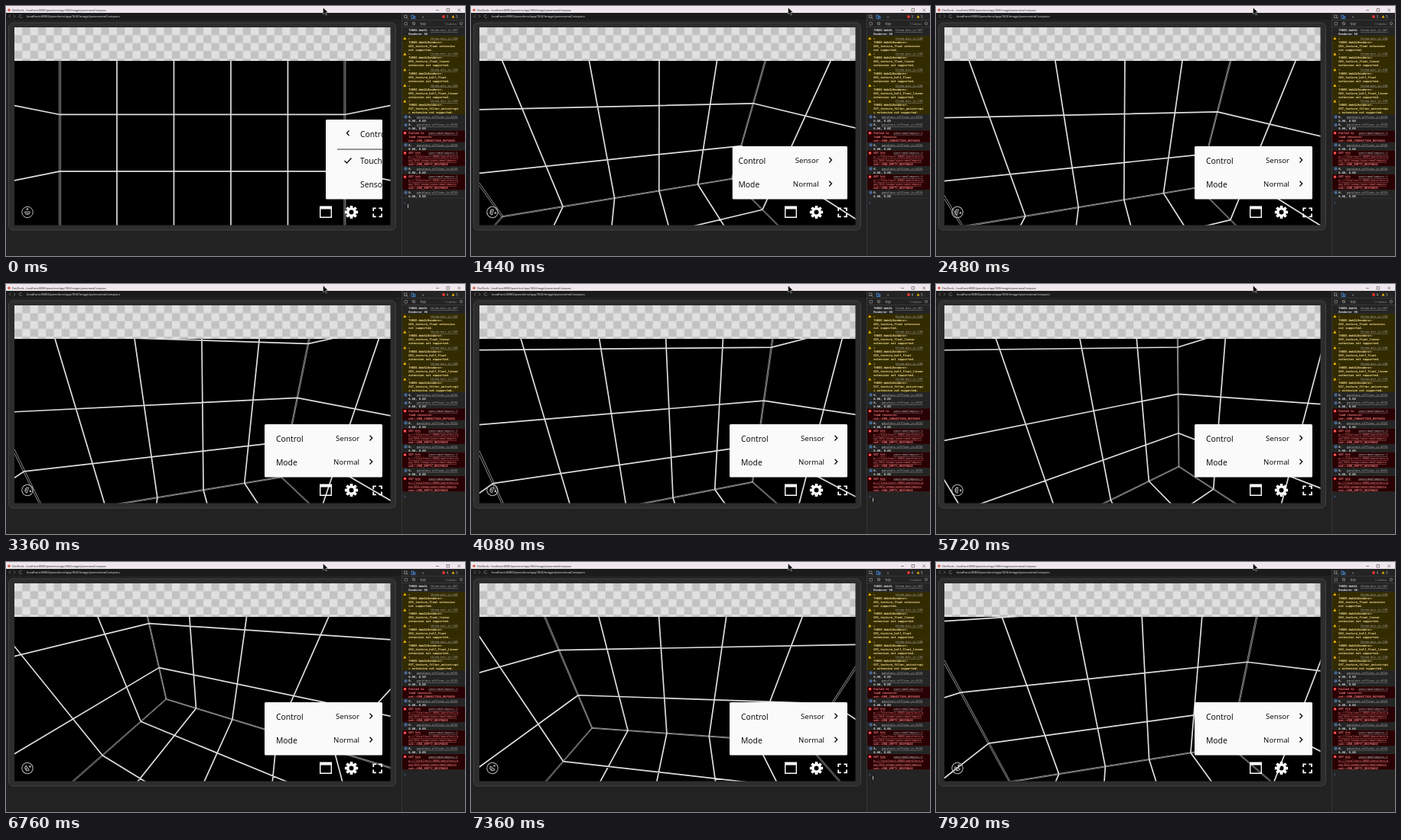
Animation, 600 px wide and 328 px high, one loop 8 s. Source, as an HTML page:

```html
<!DOCTYPE html>
<html lang="en">
<head>
<meta charset="utf-8">
<title>Panorama compass</title>
<style>
  html, body { margin: 0; width: 100%; height: 100%; overflow: hidden; background: #222; }
  svg { display: block; width: 600px; height: 328px; }
  .ui { font-family: "Open Sans", "Noto Sans", sans-serif; font-size: 4.6px; }
  .log { font-family: "DejaVu Sans Mono", monospace; font-size: 3.72px; font-weight: bold; }
  .menu { font-family: "Noto Sans", sans-serif; font-size: 10.3px; fill: #111; }
  .value { font-size: 9.6px; text-anchor: end; }
  .line { fill: none; stroke: #111; stroke-width: 1.4; }
  .link { text-anchor: end; text-decoration: underline; fill: #aaa; font-weight: normal; }
</style>
</head>
<body>
<svg viewBox="0 0 600 328" xmlns="http://www.w3.org/2000/svg">
  <defs>
    <pattern id="checker" x="11" y="28" width="20.6" height="20.6" patternUnits="userSpaceOnUse">
      <rect width="20.6" height="20.6" fill="#c2c2c2"/>
      <path d="M0 0h10.3v20.6h10.3v-10.3h-20.6z" fill="#e0e0e0"/>
    </pattern>
    <clipPath id="view"><rect x="11" y="72" width="491.5" height="215.5"/></clipPath>
    <clipPath id="panelClip"><rect id="clipBox" rx="1.5"/></clipPath>
  </defs>

  <!-- window chrome -->
  <rect width="600" height="328" fill="#222"/>
  <rect width="600" height="9" fill="#efe7ed"/>
  <circle cx="4" cy="5.2" r="1.8" fill="#d8604a"/>
  <text class="ui" x="8" y="6.700" fill="#222" style="font-size:3.7px">DevTools - localhost:8080/panolens/app/360/image/panoramaCompass</text>
  <path d="M562 5.500h4M576 3.500h3.600v3.600H576zM590.500 3.500l3.600 3.600m0-3.600l-3.600 3.600" fill="none" stroke="#444" stroke-width=".6"/>
  <rect y="9" width="517" height="9" fill="#1b1b1b"/>
  <path d="M6 11.500l-2 2 2 2M10 11.500l2 2-2 2M20.500 12.100a2 2 0 1 0 .5 2" fill="none" stroke="#888" stroke-width=".7"/>
  <text class="ui" x="27" y="14.800" fill="#eee" style="font-size:4.3px">localhost:8080/panolens/app/360/image/panoramaCompass</text>
  <rect x="3.500" y="22" width="506" height="272" rx="6" fill="#2d2d2d" stroke="#484848" stroke-width=".8"/>
  <rect x="11" y="28" width="491.500" height="44" fill="url(#checker)"/>

  <!-- panorama -->
  <g clip-path="url(#view)">
    <rect x="11" y="72" width="492" height="216"/>
    <path id="edges" fill="none" stroke="#a0a0a0" stroke-width=".9"/>
    <path id="grid" fill="none" stroke="#dedede" stroke-width="1.700"/>
  </g>
  <g id="compass" fill="none" stroke="#bbb" stroke-width="1">
    <circle r="7.200"/>
    <path d="M-3.500 -.5h7a3.500 3.500 0 0 1-7 0zM-1.500 1.500h3"/>
    <path d="M0-6l1.800 3h-3.600z" fill="#bbb" stroke="none"/>
  </g>
  <path d="M410 262.500h16v15.500h-16zM411.400 266.500v10.100h13.200v-10.100z" fill="#fff" fill-rule="evenodd"/>
  <path id="gear" fill="#fff" fill-rule="evenodd"/>
  <path d="M480.200 269v-3.700h3.600M487.400 265.300h3.600v3.700M491 272.600v3.700h-3.600M483.800 276.300h-3.600v-3.700" fill="none" stroke="#fff" stroke-width="1.800"/>

  <!-- settings panel -->
  <rect id="panel" rx="1.500" fill="#fafafa"/>
  <g clip-path="url(#panelClip)" class="menu">
    <g id="submenu">
      <path class="line" d="M433.500 163.500l-3 3.200 3 3.200M427.500 203l3 3 6-6.500"/>
      <path class="line" d="M418 188h160" style="stroke-width:1;stroke:#333"/>
      <text x="448" y="171.500">Control</text>
      <text x="448" y="207">Touch</text>
      <text x="448" y="238">Sensor</text>
    </g>
    <g id="labels"><text x="15" y="206.800">Control</text><text x="15" y="237.800">Mode</text></g>
    <g id="values">
      <text class="value" x="462" y="206">Sensor</text>
      <text class="value" x="462" y="236.800">Normal</text>
      <path class="line" d="M475.500 198.800l3.200 3.300-3.200 3.300M475.500 229.800l3.200 3.300-3.200 3.300"/>
    </g>
  </g>

  <!-- console -->
  <rect x="517" y="9" width="83" height="319" fill="#242424"/>
  <path d="M517.500 9v319M517 18.500h83M517 27.500h83" stroke="#444" stroke-width=".6"/>
  <path d="M520.500 12h3.500v3.500h-3.500zM522.500 14l3 3" fill="none" stroke="#999" stroke-width=".7"/>
  <path d="M530 12h2.600v4.500h-2.600zM533 13.500h2v3h-2z" fill="none" stroke="#4a90e2" stroke-width=".8"/>
  <g class="ui" fill="#bbb">
    <text x="544" y="15.600">»</text>
    <circle cx="572" cy="14" r="1.900" fill="#e33"/><text id="errors" x="575.500" y="15.600"></text>
    <path d="M584.500 12l2 3.600h-4z" fill="#e8b400"/><text x="588" y="15.600">5</text>
    <text x="541.500" y="24.600">top</text>
    <text x="573" y="24.600" style="font-size:4px" fill="#888">1 hidden</text>
  </g>
  <path d="M521 21.500h3.500v3.500h-3.500z" fill="none" stroke="#999" stroke-width=".6"/>
  <g fill="none" stroke="#999" stroke-width=".7">
    <circle cx="533" cy="23" r="1.800"/><path d="M531.800 21.700l2.500 2.500"/><circle cx="595" cy="23" r="1.600"/>
  </g>
  <g id="log" class="log"></g>
  <g id="late" class="log"></g>
  <g id="prompt">
    <path d="M520.500 257l1.500 1.400-1.500 1.400" fill="none" stroke="#4a90e2" stroke-width=".6"/>
    <rect id="caret" x="525" y="260.200" width=".8" height="4.800" fill="#ddd"/>
  </g>

  <path d="M414.500 2v8.800l2.100-1.900 1.500 3.200 1.400-.7-1.500-3h2.900z" fill="#000" stroke="#fff" stroke-width=".4"/>
</svg>
<script>
const LOOP = 8000, SENSOR_ON = 1120, LATE_ERROR = 3000;
const CENTER = { x: 256.7, y: 179.7 }, FOCAL = 186.2, NEAR = 0.05;
const $ = id => document.getElementById(id);
const set = (id, attrs) => { for (const k in attrs) $(id).setAttribute(k, attrs[k]); };
const clamp = x => Math.max(0, Math.min(1, x));
const easeOut = x => 1 - (1 - clamp(x)) ** 3;

// ---- console rows ----
const STYLES = {
  plain: { text: '#ddd', back: '#242424' },
  info: { text: '#ddd', back: '#242424' },
  warn: { text: '#f0d890', back: '#332b00' },
  error: { text: '#e87878', back: '#290003' },
};
function row(y, kind, link, lines) {
  const { text, back } = STYLES[kind], height = lines.length * 5 + 0.6, mid = y + 3.3;
  const icon = {
    plain: '',
    info: `<circle cx="522.6" cy="${mid}" r="2.2" fill="#47658f"/>`,
    warn: `<path d="M521.3 ${mid - 2}l2 3.600h-4z" fill="#f0bc00"/>`,
    error: `<circle cx="521.500" cy="${mid}" r="1.900" fill="#e33"/><path d="M520.800 ${mid - .7}l1.400 1.400m0-1.400l-1.400 1.400" stroke="#fff" stroke-width=".4"/>`,
  }[kind];
  const body = lines.map((s, i) => {
    const isUrl = /^p:|^pp\//.test(s);
    const inner = s.replace(/htt$/, '<tspan text-decoration="underline">htt</tspan>');
    return `<text x="526.300" y="${y + 4.5 + i * 5}" fill="${text}"${isUrl ? ' text-decoration="underline" font-weight="normal"' : ''}>${inner}</text>`;
  }).join('');
  return { height, svg: `<rect x="518" y="${y}" width="82" height="${height}" fill="${back}"/>
    <path d="M518 ${y + height}h82" stroke="#555" stroke-opacity=".6" stroke-width=".4"/>
    ${icon}${body}<text class="link" x="590.500" y="${y + 4.5}">${link}</text>` };
}
const warn = (...lines) => ['warn', 'three.min.js:130', ['▸', 'THREE.WebGLRenderer:', ...lines]];
const info = ['info', 'panolens-offline.js:8725', ['0,', '0.00, 0.00']];
const get = ['error', 'panoramaCompass:1',
  ['GET htt', 'p://localhost:8080/panolens/a', 'pp/360/image/panoramaCompass', 'net::ERR_EMPTY_RESPONSE']];
const rows = [
  ['plain', 'three.min.js:167', ['THREE.WebGL', 'Renderer 90']],
  warn('OES_texture_float extension', 'not supported.'),
  warn('OES_texture_float_linear', 'extension not supported.'),
  warn('OES_texture_half_float', 'extension not supported.'),
  warn('OES_texture_half_float_linear', 'extension not supported.'),
  warn('EXT_texture_filter_anisotropi', 'c extension not supported.'),
  info, info,
  ['error', 'panoramaCompass:1', ['Failed to', 'load resource:', 'net::ERR_CONNECTION_REFUSED']],
  info, get, info, get, info,
];
let logY = 28.6;
for (const args of rows) {
  const r = row(logY, ...args);
  $('log').innerHTML += r.svg;
  logY += r.height;
}
$('late').innerHTML = row(logY, ...get).svg;

// ---- gear icon ----
const gearPoints = [];
for (let tooth = 0; tooth < 8; tooth++)
  for (const [turn, r] of [[-.31, 6.2], [-.2, 8.8], [.2, 8.8], [.31, 6.2]]) {
    const a = tooth * Math.PI / 4 + turn;
    gearPoints.push(`${451.5 + r * Math.sin(a)} ${270.5 - r * Math.cos(a)}`);
  }
set('gear', { d: `M${gearPoints.join('L')}zM448.500 270.500a3 3 0 1 0 6 0a3 3 0 1 0-6 0z` });

// ---- room: a cube around the camera, five cells per side ----
const gridLines = [], edgeLines = [];
for (let face = 0; face < 3; face++)
  for (const side of [-1, 1])
    for (const run of [(face + 1) % 3, (face + 2) % 3])
      for (const k of [-.995, -.6, -.2, .2, .6, .995]) {
        const ends = [-1, 1].map(end => {
          const p = [k, k, k];
          p[face] = side;
          p[run] = end;
          return p;
        });
        (Math.abs(k) > .9 ? edgeLines : gridLines).push(ends);
      }

// time, yaw to the right, pitch downwards, roll (degrees)
const POSES = [
  [1120, 15.8, 27.5, 1.8], [1440, 15, 25.8, 1.7], [2480, 14.8, 22.6, 1.7], [4080, 10.4, 16, -2.8],
  [5720, 26.2, 17.2, -6.3], [6760, 62.5, 37, -2], [7920, 95.4, 21.1, -5], [8000, 97, 20.4, -5],
];
function poseAt(t) {
  if (t < SENSOR_ON) return [0, 0, 0];
  const last = POSES.length - 1;
  let i = 0;
  while (i < last - 1 && t >= POSES[i + 1][0]) i++;
  const a = POSES[i], b = POSES[i + 1], span = b[0] - a[0], x = (t - a[0]) / span;
  const slope = (j, c) => {
    const p = POSES[Math.max(0, j - 1)], q = POSES[Math.min(last, j + 1)];
    return (q[c] - p[c]) / (q[0] - p[0]);
  };
  return [1, 2, 3].map(c =>
    a[c] + (b[c] - a[c]) * x * x * (3 - 2 * x) +
    span * x * (1 - x) * (slope(i, c) * (1 - x) - slope(i + 1, c) * x));
}
function drawRoom([yaw, pitch, roll]) {
  const [cy, cp, cr] = [yaw, pitch, roll].map(d => Math.cos(d * Math.PI / 180));
  const [sy, sp, sr] = [yaw, pitch, roll].map(d => Math.sin(d * Math.PI / 180));
  const toCamera = ([x, y, z]) => {
    const right = x * cy - z * sy, ahead = x * sy + z * cy;
    const up = y * cp + ahead * sp;
    return [right * cr + up * sr, up * cr - right * sr, ahead * cp - y * sp];
  };
  const clip = (p, q) => {
    if (p[2] >= NEAR) return p;
    const f = (NEAR - p[2]) / (q[2] - p[2]);
    return p.map((v, i) => v + (q[i] - v) * f);
  };
  const project = ([x, y, z]) =>
    `${(CENTER.x + FOCAL * x / z).toFixed(2)} ${(CENTER.y - FOCAL * y / z).toFixed(2)}`;
  const path = lines => lines.map(([a, b]) => {
    const p = toCamera(a), q = toCamera(b);
    if (p[2] < NEAR && q[2] < NEAR) return '';
    return `M${project(clip(p, q))}L${project(clip(q, p))}`;
  }).join('');
  set('grid', { d: path(gridLines) });
  set('edges', { d: path(edgeLines) });
}

function drawMenu(t) {
  const p = easeOut((t - SENSOR_ON - 40) / 440);
  const left = 418 - 80 * p, top = 149 + 35 * Math.min(1, p * 1.06);
  const box = { x: left, y: top, width: 492 - left, height: 253.5 - top };
  set('panel', box);
  set('clipBox', box);
  const settle = 15 * (1 - clamp((t - 30) / 120));
  const shift = -154 * (1 - p);
  const move = (id, x, shown) => set(id, { transform: `translate(${x} 0)`, visibility: shown ? 'visible' : 'hidden' });
  move('submenu', settle + 154 * p, p < 1);
  move('labels', left + shift, p > 0);
  move('values', shift, p > 0);
}

function draw() {
  const t = performance.now() % LOOP;
  const pose = poseAt(t), late = t >= LATE_ERROR;
  drawRoom(pose);
  drawMenu(t);
  set('compass', { transform: `translate(28 270.5) rotate(${t < SENSOR_ON ? 0 : 120 - pose[0]})` });
  set('late', { visibility: late ? 'visible' : 'hidden' });
  set('prompt', { transform: `translate(0 ${late ? 20.6 : 0})` });
  set('caret', { visibility: (t + 375) % 1060 < 530 ? 'visible' : 'hidden' });
  $('errors').textContent = late ? 4 : 3;
  requestAnimationFrame(draw);
}
draw();
</script>
</body>
</html>
```
